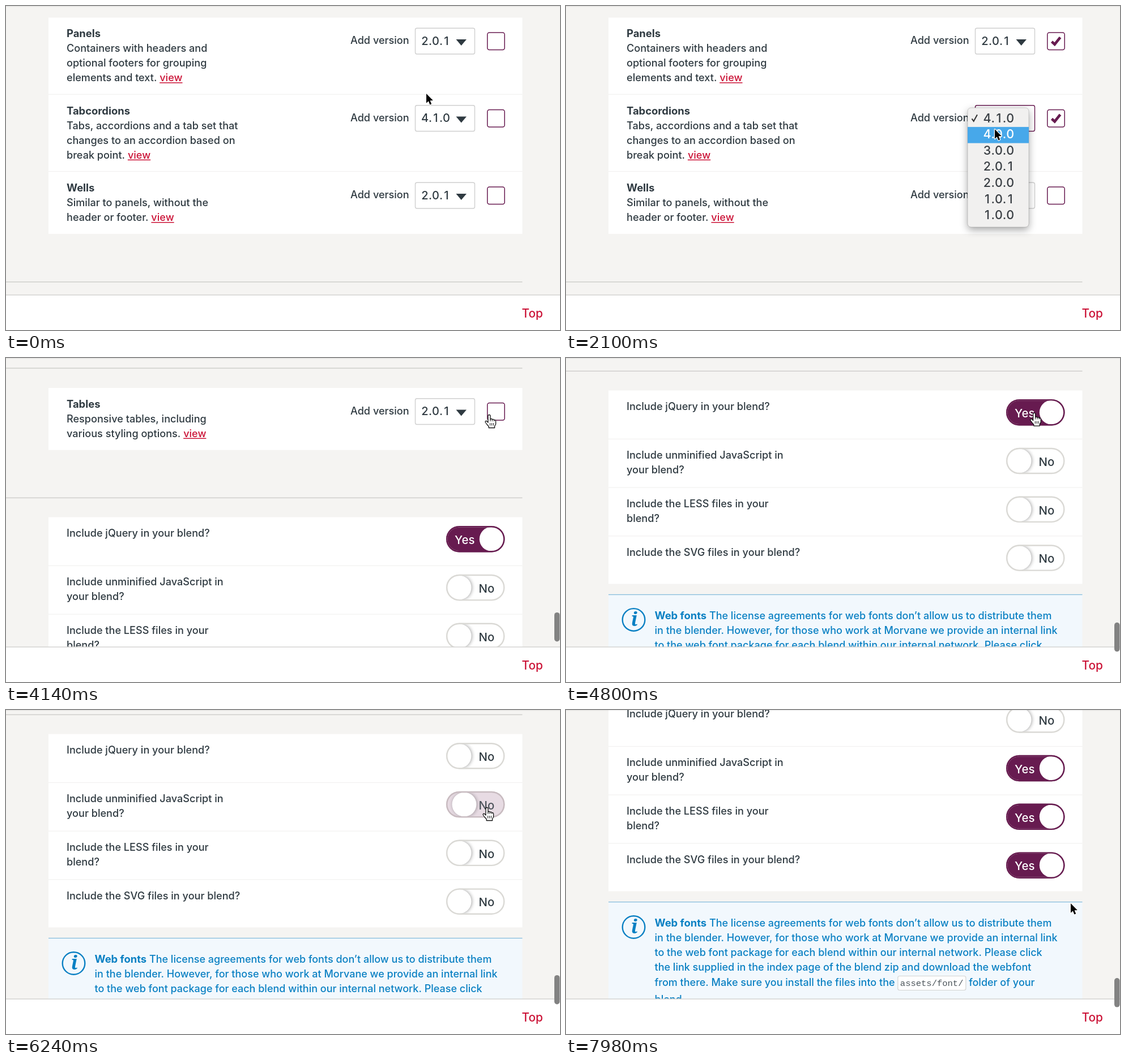
Animation of 978 by 573 pixels, one loop 8000 ms. Source, as an HTML page with a canvas:

```html
<!DOCTYPE html>
<html lang="en">
<head>
<meta charset="utf-8">
<title>Component picker</title>
<style>
html, body { margin: 0; width: 100%; height: 100%; overflow: hidden; background: #f5f4f2; }
canvas { display: block; width: 978px; height: 573px; }
</style>
</head>
<body>
<canvas id="stage"></canvas>
<script>
const W = 978, H = 573, LOOP = 8000, STEP = 60;
const INK = '#2f3a41', RED = '#cb1236', PLUM = '#671b50', BLUE = '#0a80c3';
const SANS = 'Inter, "Open Sans", sans-serif';
const canvas = document.getElementById('stage');
const ctx = canvas.getContext('2d');
const dpr = window.devicePixelRatio || 1;
canvas.width = W * dpr;
canvas.height = H * dpr;

// Component rows: top edge, title, description lines, version, time of tick
const components = [
  { y: 20.5, title: 'Panels', lines: ['Containers with headers and', 'optional footers for grouping', 'elements and text. '], version: '2.0.1', tick: 840 },
  { y: 157, title: 'Tabcordions', lines: ['Tabs, accordions and a tab set that', 'changes to an accordion based on', 'break point. '], version: '4.1.0', tick: 1560 },
  { y: 293.5, title: 'Wells', lines: ['Similar to panels, without the', 'header or footer. '], version: '2.0.1', tick: Infinity },
  { y: 523, title: 'Tables', lines: ['Responsive tables, including', 'various styling options. '], version: '2.0.1', tick: 4260 }
];

const OPTIONS_Y = 751.5, OPTION_H = 85.8;
const options = [
  { lines: ['Include jQuery in your blend?'], on: true, flip: 5520 },
  { lines: ['Include unminified JavaScript in', 'your blend?'], on: false, flip: 6180 },
  { lines: ['Include the LESS files in your', 'blend?'], on: false, flip: 6660 },
  { lines: ['Include the SVG files in your blend?'], on: false, flip: 7140 }
];

const versions = ['4.1.0', '4.0.0', '3.0.0', '2.0.1', '2.0.0', '1.0.1', '1.0.0'];
const MENU = { open: 1860, close: 2940, x: 709, y: 180, w: 108, h: 211, row: 28.6 };

// Pointer path: time, x, y
const path = [
  [60, 742, 155], [180, 797, 88], [360, 797, 88], [720, 862, 60], [960, 864, 62],
  [1140, 866, 128], [1380, 864, 194], [1560, 864, 196], [1800, 762, 196], [1920, 757, 204],
  [2100, 757, 218], [2340, 757, 226], [2640, 757, 280], [2940, 758, 283], [3240, 640, 280],
  [3360, 635, 279], [3720, 635, 279], [4140, 853, 101], [4260, 856, 98], [4500, 856, 98],
  [5160, 788, 97], [5580, 788, 97], [6060, 848, 172], [6240, 849, 173], [6540, 852, 262],
  [6720, 853, 263], [7020, 858, 352], [7320, 858, 352], [7680, 891, 342]
];

const clamp = v => Math.min(1, Math.max(0, v));
const mix = (a, b, k) => a + (b - a) * k;
const smooth = k => k * k * (3 - 2 * k);
const easeOut = (t, a, b) => 1 - (1 - clamp((t - a) / (b - a))) ** 2;

function scrollAt(t) {
  return 470 * easeOut(t, 3281, 4020) + 239 * easeOut(t, 4440, 4920) + 64 * easeOut(t, 7560, 7980);
}

function pointerAt(t) {
  const i = path.findIndex(p => p[0] > t);
  if (i === 0) return path[0].slice(1);
  if (i < 0) return path[path.length - 1].slice(1);
  const [t0, x0, y0] = path[i - 1], [t1, x1, y1] = path[i];
  const k = smooth((t - t0) / (t1 - t0));
  return [mix(x0, x1, k), mix(y0, y1, k)];
}

function rect(x, y, w, h, color) {
  ctx.fillStyle = color;
  ctx.fillRect(x, y, w, h);
}

function box(x, y, w, h, r, fill, stroke, width) {
  ctx.beginPath();
  ctx.roundRect(x, y, w, h, r);
  if (fill) { ctx.fillStyle = fill; ctx.fill(); }
  if (stroke) { ctx.strokeStyle = stroke; ctx.lineWidth = width; ctx.stroke(); }
}

function poly(points, close) {
  ctx.beginPath();
  points.forEach(([x, y]) => ctx.lineTo(x, y));
  if (close) ctx.closePath();
}

function line(points, color, width) {
  poly(points);
  ctx.strokeStyle = color;
  ctx.lineWidth = width;
  ctx.stroke();
}

function disc(x, y, r, fill) {
  ctx.beginPath();
  ctx.arc(x, y, r, 0, Math.PI * 2);
  if (fill) { ctx.fillStyle = fill; ctx.fill(); }
}

// Draws text and returns the x where it ends
function text(str, x, y, color = INK, size = 18.1, weight = 450, family = SANS) {
  ctx.font = `${weight} ${size}px ${family}`;
  ctx.fillStyle = color;
  ctx.fillText(str, x, y);
  return x + ctx.measureText(str).width;
}

const bold = (str, x, y, color) => text(str, x, y, color, 18.4, 700);
const blue = (str, x, y) => text(str, x, y, BLUE, 18, 500);

// Version number with digits of equal width
function number(str, x, y, color, size) {
  ctx.font = `450 ${size}px ${SANS}`;
  ctx.fillStyle = color;
  const digit = ctx.measureText('0').width;
  for (const ch of str) {
    const w = ctx.measureText(ch).width;
    const cell = ch === '.' ? w : digit;
    ctx.fillText(ch, x + (cell - w) / 2, y);
    x += cell;
  }
}

function rule(y) {
  rect(0, y - 0.8, 911.5, 1.6, '#d2d1cf');
}

function component(c, t) {
  const { y } = c;
  const isTabs = c.title === 'Tabcordions';
  const picked = isTabs && t >= MENU.close;
  const focused = isTabs && t >= MENU.open;
  bold(c.title, 107, y + 34.5, INK);
  let end = 0;
  c.lines.forEach((s, i) => { end = text(s, 107, y + 60.5 + i * 26); });
  const base = y + 34.5 + c.lines.length * 26;
  const linkEnd = text('view', end, base, RED);
  rect(end, base + 2, linkEnd - end, 1.5, RED);

  text('Add version', 608, y + 46.5);
  box(722.5, y + 18.8, 105, 45.7, 3, '#fff', focused ? PLUM : '#cfcfcf', 1.4);
  number(picked ? '2.0.1' : c.version, 733, y + 48, INK, 20);
  poly([[794.5, y + 38.5], [813, y + 38.5], [803.7, y + 49.5]], true);
  ctx.fillStyle = INK;
  ctx.fill();

  box(849.8, y + 26.5, 30.4, 30.4, 3.5, '#fff', PLUM, 1.5);
  if (t >= c.tick) {
    line([[857.5, y + 42.5], [862.7, y + 47.3], [872.5, y + 35]], PLUM, 4.6);
  }
  if (isTabs && t >= 3240) warning(932.5, y + 29);
}

function warning(x, y) {
  ctx.lineJoin = 'round';
  poly([[x, y + 1], [x + 10, y + 19.5], [x - 10, y + 19.5]], true);
  ctx.strokeStyle = '#6a6a6a';
  ctx.lineWidth = 1.4;
  ctx.stroke();
  ctx.lineJoin = 'miter';
  line([[x, y + 7], [x, y + 13.5]], '#555', 2);
  disc(x, y + 16.3, 1.2, '#555');
}

function toggle(y, k) {
  const mid = y + 23.2;
  ctx.save();
  box(777, y, 103.5, 46.5, 23.2, '#fff');
  ctx.clip();
  ctx.globalAlpha = k;
  rect(777, y, 104, 47, PLUM);
  text('Yes', 792, y + 32, '#fff', 20.4);
  ctx.globalAlpha = 1 - k;
  text('No', 834.5, y + 32, INK, 20.4);
  ctx.globalAlpha = 1;
  ctx.shadowColor = `rgba(0,0,0,${0.38 * (1 - k)})`;
  ctx.shadowBlur = 6 * dpr;
  ctx.shadowOffsetX = dpr;
  disc(mix(800, 857.3, k), mid, 21.5, '#fff');
  ctx.restore();
  box(778.2, y + 1.2, 101.1, 44.1, 22, null, '#dad9d5', 2.4);
  ctx.globalAlpha = k;
  box(778.2, y + 1.2, 101.1, 44.1, 22, null, PLUM, 2.4);
  ctx.globalAlpha = 1;
}

function option(o, i, t) {
  const y = OPTIONS_Y + i * OPTION_H;
  if (i) rect(75, y - 0.5, 836.5, 1, '#efeeed');
  o.lines.forEach((s, n) => text(s, 107, y + 34.7 + n * 26));
  const k = smooth(clamp((t - o.flip) / 240));
  toggle(y + 15.5, o.on ? 1 - k : k);
}

function notice() {
  const y = 1112.5, base = y + 43.2;
  rect(75, y, 836.5, 240, '#f2f8fd');
  rect(75, y - 0.6, 836.5, 1.3, '#86bcdc');
  disc(119.5, y + 44.5, 19.8);
  ctx.strokeStyle = BLUE;
  ctx.lineWidth = 2.4;
  ctx.stroke();
  text('i', 114.5, y + 55.5, BLUE, 34, 'italic 700', '"Noto Serif", serif');

  const end = bold('Web fonts', 156.5, base, BLUE);
  blue(' The license agreements for web fonts don’t allow us to distribute them', end, base);
  [
    'in the blender. However, for those who work at Morvane we provide an internal link',
    'to the web font package for each blend within our internal network. Please click',
    'the link supplied in the index page of the blend zip and download the webfont'
  ].forEach((s, i) => blue(s, 156.5, base + 26 * (i + 1)));
  const last = base + 105.3;
  const x = blue('from there. Make sure you install the files into the ', 156.5, last);
  box(x + 0.5, last - 17.5, 120, 25, 3, '#fff', '#d3d3d1', 1.2);
  text('assets/font/', x + 4.5, last, '#4b545a', 15.5, 400, '"Liberation Mono", monospace');
  blue(' folder of your', x + 121, last);
  blue('blend.', 156.5, last + 30);
}

function page(t) {
  rect(75, 20.5, 836.5, 382.5, '#fff');
  rect(75, 523, 836.5, 109.7, '#fff');
  rect(75, OPTIONS_Y, 836.5, 342, '#fff');
  rect(75, 155.7, 836.5, 1, '#efeeed');
  rect(75, 292.2, 836.5, 1, '#efeeed');
  rule(488);
  rule(717.3);
  components.forEach(c => component(c, t));
  options.forEach((o, i) => option(o, i, t));
  notice();
}

function menu(t, py) {
  if (t < MENU.open || t >= MENU.close) return;
  const { x, y, w, h, row } = MENU;
  ctx.save();
  ctx.shadowColor = 'rgba(0,0,0,.35)';
  ctx.shadowBlur = 14 * dpr;
  ctx.shadowOffsetY = 5 * dpr;
  box(x, y, w, h, 6, '#f1f0ef');
  ctx.restore();
  box(x, y, w, h, 6, null, 'rgba(0,0,0,.2)', 0.8);
  const top = y + 5.3;
  const hover = Math.floor((py - top) / row);
  versions.forEach((v, i) => {
    const ry = top + i * row;
    if (i === hover) rect(x, ry, w, row, '#47a8ea');
    number(v, 736.5, ry + 20.3, i === hover ? '#fff' : '#3a3f44', 21.5);
    if (i === 0) line([[716.5, ry + 14], [719.7, ry + 18.5], [726, ry + 7]], i === hover ? '#fff' : '#333', 2);
  });
}

function footer() {
  rect(0, 511, W, H - 511, '#fff');
  rect(0, 510.4, W, 1.4, '#d3d2d0');
  text('Top', 910.5, 551, RED, 20.8);
}

function thumb(t, scroll) {
  ctx.globalAlpha = clamp((t - 3360) / 120);
  box(968, 412.6 + scroll * 0.0795, 9.5, 51.5, 4.7, '#828282');
  ctx.globalAlpha = 1;
}

function overTarget(x, y, scroll) {
  const inside = (l, r, top, bottom) => x >= l && x <= r && y + scroll >= top && y + scroll <= bottom;
  return components.some(c => inside(849, 881, c.y + 26, c.y + 58)) ||
    options.some((o, i) => inside(777, 880, OPTIONS_Y + i * OPTION_H + 15, OPTIONS_Y + i * OPTION_H + 62));
}

function arrow() {
  poly([[0, 0], [0, 16.8], [3.8, 13.3], [6.4, 19.4], [9.2, 18.2], [6.6, 12.2], [11.8, 12]], true);
  ctx.strokeStyle = '#fff';
  ctx.lineWidth = 2.4;
  ctx.stroke();
  ctx.fillStyle = '#000';
  ctx.fill();
}

function hand() {
  const shape = new Path2D('M-2 12V1.5Q-2-.5 0-.5T2 1.5V8Q2 6.5 3.7 6.5T5.3 8Q5.5 7.3 7 7.3T8.6 9Q9 8.4 10.2 8.6T11.6 10.5V16L9.6 19.5V22.5H-.8V20L-4 16.5-6.8 12.5Q-7.3 10.8-5.8 10.3-4.4 10-2 13Z');
  ctx.fillStyle = '#fff';
  ctx.fill(shape);
  ctx.strokeStyle = '#111';
  ctx.lineWidth = 1.3;
  ctx.stroke(shape);
  for (const x of [2, 5.3, 8.6]) line([[x, 8], [x, 11]], '#111', 1);
  for (const x of [1.7, 4.6, 7.5]) line([[x, 14], [x, 18.5]], '#111', 1);
}

function draw(t) {
  const scroll = scrollAt(t);
  const [px, py] = pointerAt(t);
  ctx.setTransform(dpr, 0, 0, dpr, 0, 0);
  rect(0, 0, W, H, '#f5f4f2');
  ctx.save();
  ctx.translate(0, -scroll);
  page(t);
  ctx.restore();
  rect(0, 0, W, 1, 'rgba(0,0,0,.07)');
  rect(0, 1, W, 1, 'rgba(0,0,0,.025)');
  menu(t, py);
  footer();
  thumb(t, scroll);
  ctx.save();
  ctx.translate(px, py);
  ctx.lineJoin = 'round';
  if (overTarget(px, py, scroll)) hand(); else arrow();
  ctx.restore();
}

// Each picture is held for one step
function tick(now) {
  draw(Math.floor((now % LOOP) / STEP) * STEP);
  requestAnimationFrame(tick);
}
draw(0);
requestAnimationFrame(tick);
</script>
</body>
</html>
```
